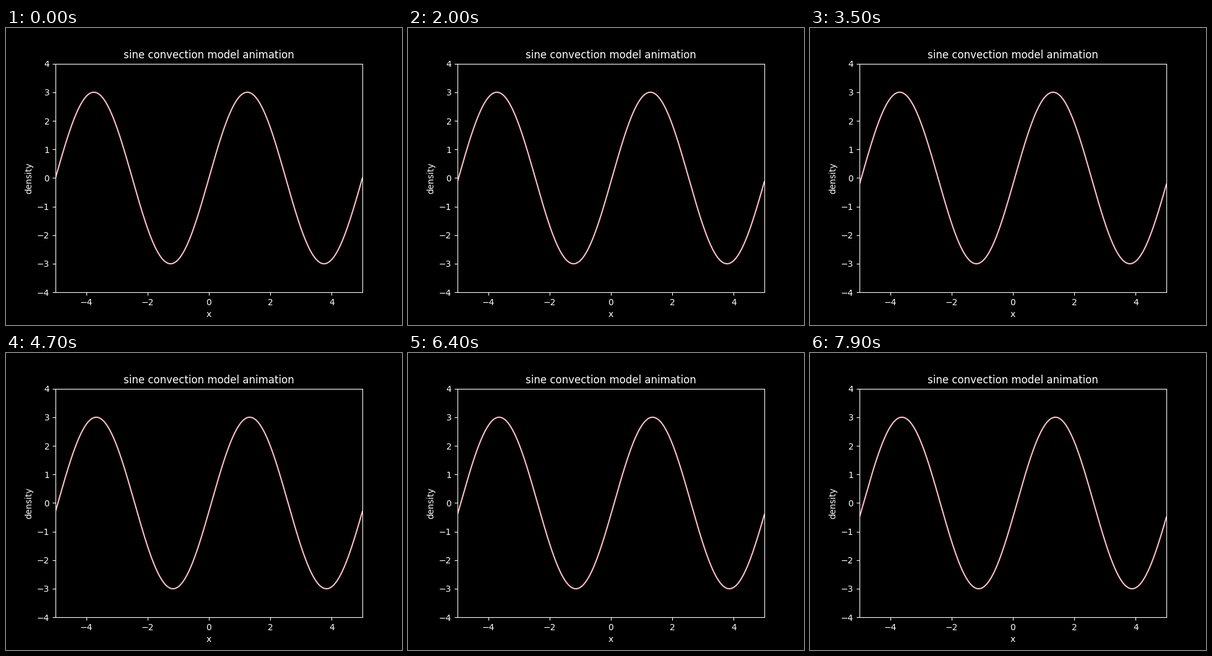
Write a matplotlib script that moves like this. It is 640 px wide and 480 px high and loops after 8000 ms.

```python
import numpy as np
import matplotlib.pyplot as plt
from matplotlib.animation import FuncAnimation

FRAMES = 80
INTERVAL = 100      # ms
WAVELENGTH = 5
AMPLITUDE = 3
STEP = 1 / 600      # distance travelled per frame

plt.style.use("dark_background")

x = np.linspace(-5, 5, 1001)


def density(i):
    return AMPLITUDE * np.sin(2 * np.pi / WAVELENGTH * (x - STEP * i))


fig, ax = plt.subplots(figsize=(6.4, 4.8), dpi=100)
ax.set(xlim=(-5, 5), ylim=(-4, 4), xlabel="x", ylabel="density",
       title="sine convection model animation")
line, = ax.plot(x, density(0), color="pink", lw=1.5)


def update(i):
    line.set_ydata(density(i))
    return line,


anim = FuncAnimation(fig, update, frames=FRAMES, interval=INTERVAL,
                     repeat=True, repeat_delay=0)
plt.show()
```
